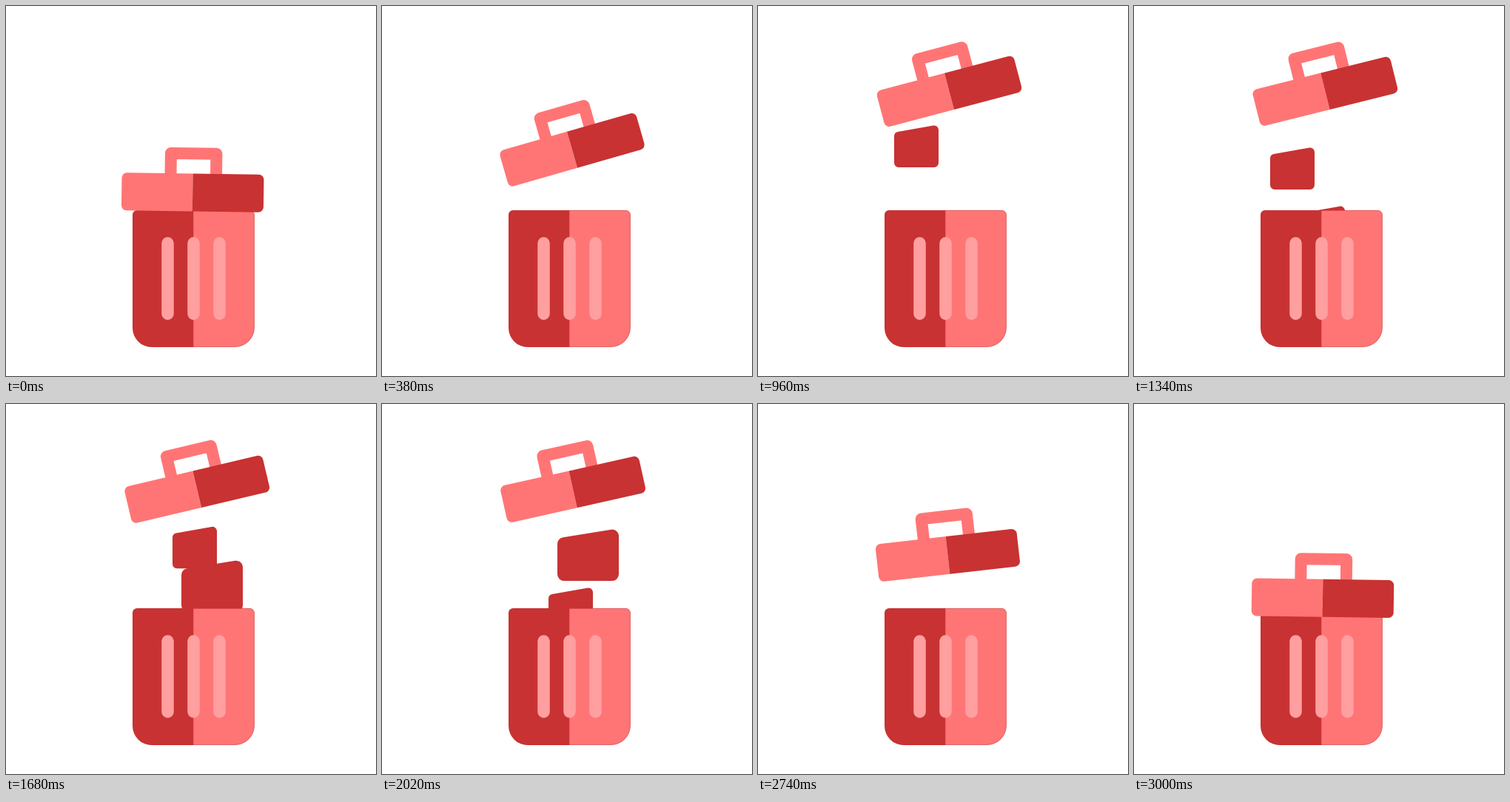
Animation, 500 px wide and 500 px high, one loop 3580 ms. Source, as an HTML page:

```html
<!DOCTYPE html>
<html>
<head>
<meta charset="utf-8">
<style>
  html, body { margin: 0; width: 100%; height: 100%; overflow: hidden; background: #fff; }
  svg { display: block; width: 100%; height: 100%; }
  .dark { fill: #c83232; }
  .light { fill: #ff7575; }
  .junk { fill: #c83232; stroke: #c83232; stroke-linejoin: round; }
</style>
</head>
<body>
<svg viewBox="0 0 500 500">
  <path class="junk" stroke-width="12" d="M6 15L54 6.5V51H6Z"/>
  <path class="junk" stroke-width="12" d="M6 15L54 6.5V51H6Z"/>
  <path class="junk" stroke-width="18" d="M9 20L74 9.5V61H9Z"/>

  <path class="light" stroke="#c83232" stroke-width=".6"
    d="M253 276.3H329.5A6 6 0 0 1 335.5 282.3V434.5A26 26 0 0 1 309.5 460.5H253Z"/>
  <path class="dark" d="M253 276H177A6 6 0 0 0 171 282V435A26 26 0 0 0 197 461H253Z"/>
  <path d="M218.5 320.5V416M253.5 320.5V416M288.5 320.5V416"
    stroke="#ff9f9f" stroke-width="16.5" stroke-linecap="round"/>

  <g id="lid">
    <path d="M-30 -20V-52.7H31.5V-20" fill="none" stroke="#ff7575" stroke-width="16" stroke-linejoin="round"/>
    <path class="light" d="M0 -25.5H-89A7 7 0 0 0 -96 -18.5V18.5A7 7 0 0 0 -89 25.5H0Z"/>
    <path class="dark" d="M0 -25.5H89A7 7 0 0 1 96 -18.5V18.5A7 7 0 0 1 89 25.5H0Z"/>
  </g>
</svg>
<script>
const LOOP = 3580, ACTIVE = 3000, STEP = 20, RIM = 276;
const lid = document.getElementById('lid');
const junk = document.querySelectorAll('.junk');

// Keys are [time, value] pairs
const lidX = [[0, 252.2], [380, 257], [900, 258.5], [2460, 258], [3000, 255]];
const lidY = [[0, 252], [900, 115.3], [2340, 115.3], [3000, 262.3]];
const lidTurn = [[0, 0.8], [340, -16.1], [2560, -11.5], [3000, 0.8]];

// Each piece hops out of the bin and drops back in
const hops = [
  { x: 184, peak: 1077, half: 476, height: 122.4 },
  { x: 225, peak: 1700, half: 370, height: 111 },
  { x: 237, peak: 1960, half: 440, height: 109 }
];

function at(keys, t) {
  let i = 1;
  while (i < keys.length - 1 && t > keys[i][0]) i++;
  const [t0, a] = keys[i - 1], [t1, b] = keys[i];
  return a + (b - a) * (t - t0) / (t1 - t0);
}

function draw(t) {
  lid.setAttribute('transform',
    `translate(${at(lidX, t)} ${at(lidY, t)}) rotate(${at(lidTurn, t)})`);
  hops.forEach(({ x, peak, half, height }, i) => {
    const u = (t - peak) / half;
    const y = RIM - height * (1 - u * u);
    junk[i].setAttribute('transform', `translate(${x} ${y})`);
    junk[i].setAttribute('visibility', Math.abs(u) < 1 ? 'visible' : 'hidden');
  });
}

const start = performance.now();
function tick() {
  const t = (performance.now() - start) % LOOP;
  draw(Math.min(ACTIVE, Math.floor(t / STEP) * STEP));
  requestAnimationFrame(tick);
}
tick();
</script>
</body>
</html>
```
